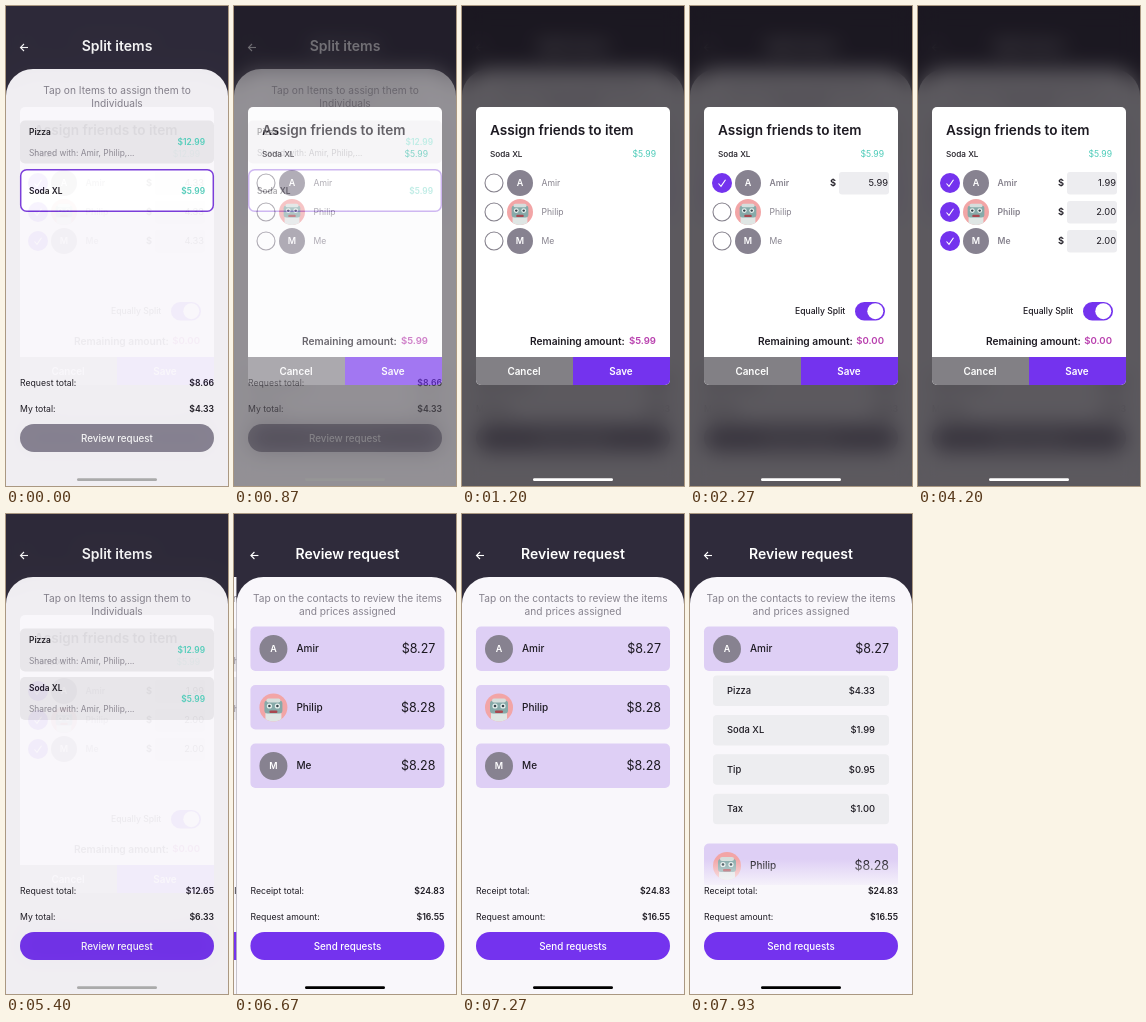
Animation, 222 px wide and 480 px high, one loop 8000 ms. Source, as an HTML page with a canvas:

```html
<!DOCTYPE html>
<html lang="en">
<head>
<meta charset="utf-8">
<title>Split items</title>
<style>
html, body { margin: 0; width: 100%; height: 100%; overflow: hidden; background: #2f2b3b; }
canvas { display: block; width: 222px; height: 480px; }
</style>
</head>
<body>
<canvas id="stage"></canvas>
<script>
const W = 222, H = 480, LOOP = 8000;
const INK = '#1d1a22', GREY = '#87838e', PURPLE = '#7433ee', TEAL = '#4ccbb8';
const SHEET = '#f9f7fb', HEADER = '#2f2b3b', FIELD = '#ededf0';
const FRIENDS = ['Amir', 'Philip', 'Me'];
const SHARED = `Shared with: ${FRIENDS[0]}, ${FRIENDS[1]},...`;
const DRINK = 'Soda XL';

const dpr = window.devicePixelRatio || 1;
const stage = document.getElementById('stage');
const makeLayer = (canvas = document.createElement('canvas')) => {
  canvas.width = W * dpr;
  canvas.height = H * dpr;
  const context = canvas.getContext('2d');
  context.scale(dpr, dpr);
  return context;
};
const screen = makeLayer(stage), pageLayer = makeLayer(), overlay = makeLayer();
let g = screen;

const clamp = v => Math.min(1, Math.max(0, v));
const span = (t, start, length) => clamp((t - start) / length);
const easeOut = p => 1 - (1 - p) ** 3;
const spring = (t, start) => {
  const u = 15 * Math.max(0, t - start) / 1000;
  return 1 - (1 + u) * Math.exp(-u);
};

// y is the vertical centre of the capitals
function text(str, x, y, size, color = INK, weight = 400, align = 'left') {
  g.font = `${weight} ${size}px Inter, "Open Sans", sans-serif`;
  g.fillStyle = color;
  g.textAlign = align;
  g.fillText(str, x, y + size * 0.36);
}

function box(x, y, w, h, r, fill, stroke) {
  g.beginPath();
  g.roundRect(x, y, w, h, r);
  if (fill) { g.fillStyle = fill; g.fill(); }
  if (stroke) { g.strokeStyle = stroke; g.lineWidth = 1.5; g.stroke(); }
}

function disc(x, y, r, fill) {
  g.beginPath();
  g.arc(x, y, r, 0, 7);
  g.fillStyle = fill;
  g.fill();
}

function line(points, color, width) {
  g.beginPath();
  points.forEach(([x, y]) => g.lineTo(x, y));
  g.strokeStyle = color;
  g.lineWidth = width;
  g.stroke();
}

function robot(x, y, r) {
  g.save();
  disc(x, y, r, '#f2a5a6');
  g.clip();
  g.translate(x, y);
  g.scale(r / 14, r / 14);
  box(-8, 4, 16, 11, 3, '#dfe6e4');
  box(-9, -7, 18, 13, 3, '#86aaa9');
  box(-7, -9, 14, 4, 2, '#d5dedc');
  for (const side of [-4, 4]) {
    disc(side, -1.5, 2.6, '#e9f1ef');
    disc(side, -1.5, 1.3, '#35444c');
  }
  box(-4, 3, 8, 2.5, 1, '#a8474f');
  g.restore();
}

function avatar(index, x, y, r) {
  if (index === 1) return robot(x, y, r);
  disc(x, y, r, '#878290');
  text(FRIENDS[index][0], x, y, 9, '#fff', 600, 'center');
}

function frame(title, hint) {
  g.fillStyle = HEADER;
  g.fillRect(0, 0, W, H);
  box(0, 63, W, H, [27, 27, 0, 0], SHEET);
  line([[22, 41.5], [14.5, 41.5]], '#fff', 1.1);
  line([[18, 38], [14.5, 41.5], [18, 45]], '#fff', 1.1);
  text(title, 111, 40, 14, '#fff', 600, 'center');
  hint.forEach((row, i) => text(row, 111, 84 + 13 * i, 10.2, GREY, 400, 'center'));
}

function footer(totals, label, color) {
  totals.forEach(([name, value], i) => {
    text(name, 14, 377 + 26 * i, 8.7);
    text(value, 208, 377 + 26 * i, 8.7, INK, 600, 'right');
  });
  box(14, 418, 194, 28, 14, color);
  text(label, 111, 432, 9.8, '#fff', 500, 'center');
}

function itemRow(y, name, price, assigned) {
  if (assigned) {
    box(14, y, 194, 43, 5, '#e7e5e9');
    text(name, 23, y + 11, 8.4, INK, 600);
    text(SHARED, 23, y + 32, 8.4, GREY);
  } else {
    box(14.7, y + 0.7, 192.6, 41.6, 6, '#fff', '#7433d8');
    text(name, 23, y + 21.5, 8.4, INK, 600);
  }
  text(price, 199, y + 21.5, 8.4, TEAL, 600, 'right');
}

function itemsPage(done) {
  frame('Split items', ['Tap on Items to assign them to', 'Individuals']);
  itemRow(114.5, 'Pizza', '$12.99', true);
  itemRow(163, DRINK, '$5.99', done);
  footer([['Request total:', done ? '$12.65' : '$8.66'], ['My total:', done ? '$6.33' : '$4.33']],
    'Review request', done ? PURPLE : '#8a8595');
}

function reviewPage(open) {
  frame('Review request', ['Tap on the contacts to review the items', 'and prices assigned']);
  const shift = 158.5 * open;
  g.save();
  g.beginPath();
  g.rect(0, 106, W, 265);
  g.clip();
  ['$8.27', '$8.28', '$8.28'].forEach((amount, i) => {
    const y = 112.5 + 58.5 * i + (i ? shift : 0);
    box(14, y, 194, 44.5, 5, '#decff5');
    avatar(i, 37, y + 22.5, 14);
    text(FRIENDS[i], 60, y + 22, 10, INK, 500);
    text(amount, 199, y + 22, 12.5, INK, 400, 'right');
  });
  if (open > 0) {
    const fade = g.createLinearGradient(0, 345, 0, 371);
    fade.addColorStop(0, 'rgba(249,247,251,0)');
    fade.addColorStop(1, 'rgba(249,247,251,.85)');
    g.fillStyle = fade;
    g.fillRect(0, 345, W, 26);
    g.beginPath();
    g.rect(0, 157, W, shift);
    g.clip();
    [['Pizza', '$4.33'], [DRINK, '$1.99'], ['Tip', '$0.95'], ['Tax', '$1.00']].forEach(([name, price], i) => {
      const y = 161.5 + 39.4 * i;
      box(23, y, 176, 30.5, 4, FIELD);
      text(name, 37, y + 15, 9.4, INK, 500);
      text(price, 185, y + 15, 9.4, INK, 500, 'right');
    });
  }
  g.restore();
  footer([['Receipt total:', '$24.83'], ['Request amount:', '$16.55']], 'Send requests', PURPLE);
}

function modal(item, price, shares) {
  box(14, 101, 194, 278, 5, '#fff');
  text('Assign friends to item', 28, 124, 13.6, INK, 600);
  text(item, 28, 148, 8.2, INK, 500);
  text(price, 194, 148, 8.6, TEAL, 400, 'right');
  FRIENDS.forEach((name, i) => {
    const y = 177 + 29 * i, checked = i < shares.length;
    if (checked) {
      disc(32, y, 10, PURPLE);
      line([[28.5, y + 0.5], [31, y + 3.3], [35.5, y - 3.3]], '#fff', 1.1);
      text('$', 140, y, 9.3, INK, 600);
      box(149, y - 11, 50, 22.5, 3, FIELD);
      text(shares[i], 198, y, 9.3, INK, 400, 'right');
    } else {
      g.beginPath();
      g.arc(32, y, 9, 0, 7);
      g.strokeStyle = GREY;
      g.lineWidth = 1.1;
      g.stroke();
    }
    avatar(i, 58, y, 13);
    text(name, 79.5, y, 8.6, GREY, checked ? 600 : 400);
  });
  if (shares.length) {
    text('Equally Split', 105, 305, 8.6, INK, 500);
    box(165, 296, 30, 18.5, 9.25, PURPLE);
    disc(185.3, 305.2, 8, '#fff');
  }
  text('Remaining amount:', 68, 335, 10.2, INK, 600);
  text(shares.length ? '$0.00' : price, 194, 335, 9.6, '#b83fae', 600, 'right');
  box(14, 351, 97, 28, [0, 0, 0, 5], '#828085');
  box(111, 351, 97, 28, [0, 0, 5, 0], PURPLE);
  text('Cancel', 62, 365, 9.9, '#fff', 600, 'center');
  text('Save', 159, 365, 9.9, '#fff', 600, 'center');
}

function drinkShares(t) {
  if (t < 1870) return [];
  if (t < 2730) return ['5.99'];
  if (t < 3670) return ['2.99', '3.00'];
  return ['1.99', '2.00', '2.00'];
}

// The dialog is open before the loop starts and again from 730 to 5200
function visibility(t, ease, opening, closing) {
  if (t < 730) return 1 - ease(span(t, -200, closing));
  if (t < 5200) return ease(span(t, 730, opening));
  return 1 - ease(span(t, 5200, closing));
}

function stamp(source, target, alpha = 1, filter = 'none') {
  target.save();
  target.globalAlpha = alpha;
  target.filter = filter;
  target.drawImage(source.canvas, 0, 0, W, H);
  target.restore();
}

function drawPage(t) {
  const slide = spring(t, 6235), settled = slide > 0.999;
  g = pageLayer;
  if (!settled) {
    g.save();
    g.translate(-66 * slide, 0);
    itemsPage(t >= 5200);
    g.restore();
  }
  if (slide > 0) {
    g.save();
    g.translate(settled ? 0 : W * (1 - slide), 0);
    reviewPage(easeOut(span(t, 7450, 430)));
    g.restore();
  }
}

function drawOverlay(t) {
  g = overlay;
  stamp(pageLayer, g);
  stamp(pageLayer, g, 1, `blur(${10 * dpr}px)`);
  g.fillStyle = 'rgba(18,16,22,.68)';
  g.fillRect(0, 0, W, H);
  if (t < 730) modal('Pizza', '$12.99', ['4.33', '4.33', '4.33']);
  else modal(DRINK, '$5.99', drinkShares(t));
}

function render(t) {
  drawPage(t);
  stamp(pageLayer, screen);
  const shown = visibility(t, easeOut, 480, 320);
  if (shown > 0) {
    drawOverlay(t);
    stamp(overlay, screen, shown);
  }
  g = screen;
  const tone = Math.round(255 * visibility(t, p => p, 240, 600));
  box(71, 472.3, 80, 2.8, 1.4, `rgb(${tone},${tone},${tone})`);
}

const begin = performance.now();
function tick() {
  render((performance.now() - begin) % LOOP);
  requestAnimationFrame(tick);
}
tick();
</script>
</body>
</html>
```
